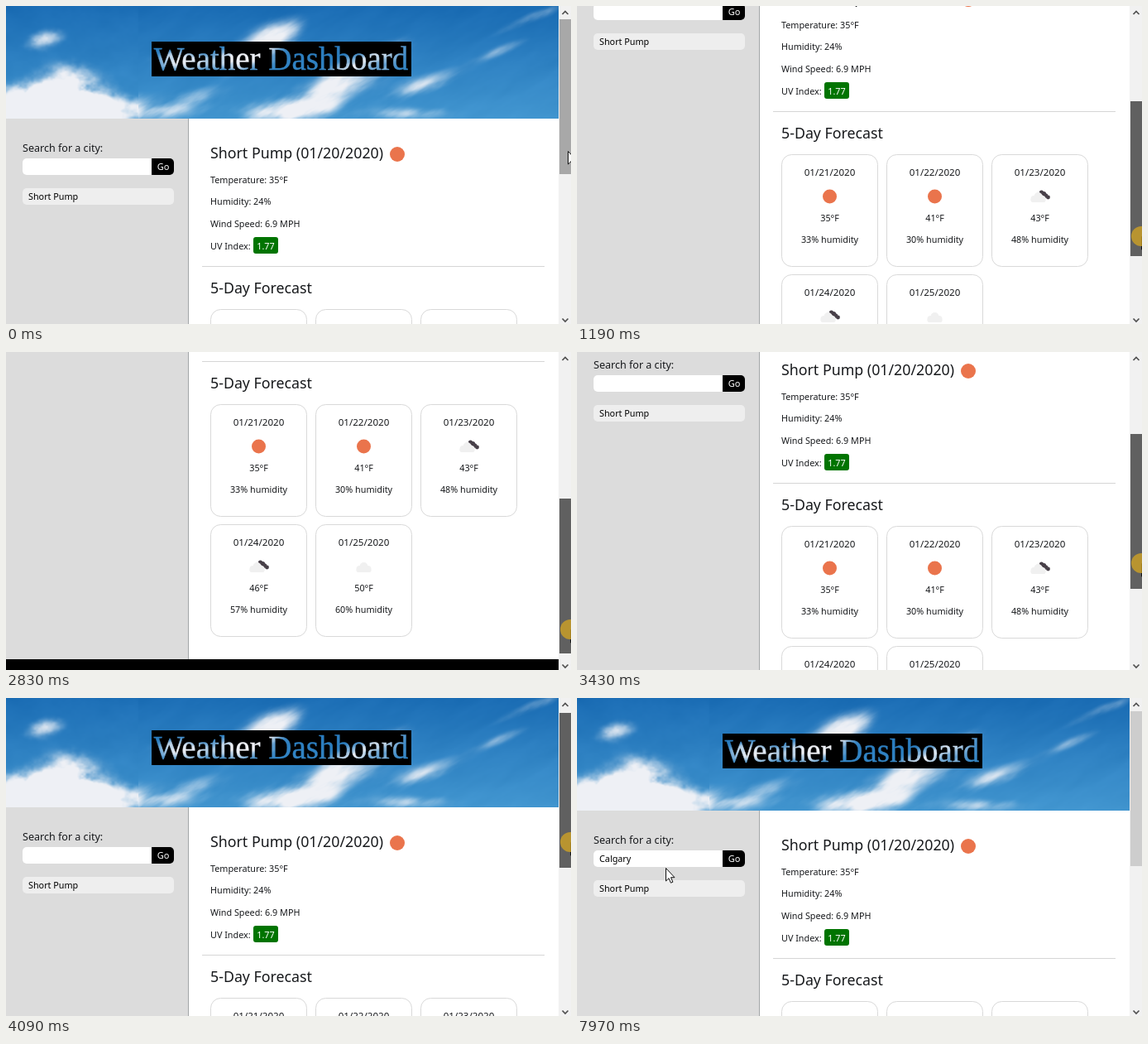
Animation, 683 px wide and 384 px high, one loop 8 s. Source, as an HTML page with a canvas:

```html
<!DOCTYPE html>
<html lang="en">
<head>
<meta charset="utf-8">
<title>Weather Dashboard</title>
<style>
  html, body { margin: 0; width: 100%; height: 100%; overflow: hidden; background: #fff; }
  #stage { position: relative; width: 683px; height: 384px; overflow: hidden; }
  #page { position: absolute; left: 0; top: 0; width: 668px; height: 695px; background: #fff; }
  header { position: absolute; left: 0; top: 0; width: 668px; height: 136px; isolation: isolate; overflow: hidden; }
  canvas { display: block; }
  h1 {
    position: absolute; left: 175.5px; top: 43px; width: 314px; height: 42px; margin: 0;
    font: 400 39px/42px "Liberation Serif", serif; text-align: center; white-space: nowrap;
    color: #fff; background: #000; mix-blend-mode: multiply; -webkit-text-stroke: .4px #fff;
  }
  svg { position: absolute; left: 0; top: 0; font-family: "Noto Sans", "Open Sans", sans-serif; }
  text { white-space: pre; }
</style>
</head>
<body>
<div id="stage">
  <div id="page">
    <header><canvas id="sky" width="668" height="136"></canvas><h1>Weather Dashboard</h1></header>
    <svg id="content" width="668" height="695"></svg>
  </div>
  <svg id="overlay" width="683" height="384"></svg>
</div>
<script>
const LOOP = 8000, MAX_SCROLL = 311, THUMB_H = 187, THUMB_TRAVEL = 165;
const $ = id => document.getElementById(id);
const clamp = (v, a = 0, b = 1) => Math.min(b, Math.max(a, v));
const mix = (a, b, k) => a + (b - a) * k;

// ---- Sky ----
const hash = (x, y) => { const s = Math.sin(x * 127.1 + y * 311.7) * 43758.5453; return s - Math.floor(s); };
function noise(x, y) {
  const i = Math.floor(x), j = Math.floor(y);
  const fade = f => f * f * (3 - 2 * f), u = fade(x - i), v = fade(y - j);
  return mix(mix(hash(i, j), hash(i + 1, j), u), mix(hash(i, j + 1), hash(i + 1, j + 1), u), v);
}
function fbm(x, y) {
  let sum = 0;
  for (let o = 0, amp = .53; o < 4; o++, amp /= 2, x *= 2.03, y *= 2.03) sum += amp * noise(x, y);
  return sum;
}
// x, y, rx, ry, density, slope
const CLOUDS = [
  [75, 98, 38, 26, 1.4, 0], [20, 114, 40, 20, 1.3, 0], [112, 119, 42, 18, 1.1, 0], [60, 132, 90, 14, 1.2, 0],
  [45, 40, 24, 12, .7, .2], [190, 126, 50, 10, .4, 0], [225, 108, 55, 13, .4, .1],
  [325, 33, 32, 20, .8, .3], [288, 62, 36, 16, 1, .1], [215, 66, 36, 14, .75, 0],
  [395, 98, 75, 26, .8, .45], [435, 62, 40, 12, .5, .4], [505, 95, 45, 12, .6, .3],
  [330, 126, 60, 14, .6, 0], [485, 129, 60, 9, .55, 0], [635, 14, 45, 8, .55, .4], [600, 52, 40, 8, .4, .4]
];
function paintSky() {
  const ctx = $('sky').getContext('2d'), W = 668, H = 136, img = ctx.createImageData(W, H);
  for (let y = 0, p = 0; y < H; y++) for (let x = 0; x < W; x++, p += 4) {
    let d = 0;
    for (const [cx, cy, rx, ry, amp, slope] of CLOUDS) {
      const dx = x - cx, dy = y - cy + dx * slope;
      d += amp * Math.exp(-((dx / rx) ** 2) - (dy / ry) ** 2);
    }
    const n = x < 160 ? fbm(x / 24, y / 20) : fbm((x * .87 - y * .5) / 48, (x * .5 + y * .87) / 15);
    let a = clamp((d * (.25 + 1.4 * n) - .12) / .85);
    a = a * a * (3 - 2 * a);
    const g = y / H, shade = 10 * (n - .5);
    img.data[p] = mix(mix(26, 66, g) + shade, 238, a);
    img.data[p + 1] = mix(mix(108, 150, g) + shade, 240, a);
    img.data[p + 2] = mix(mix(180, 208, g) + shade, 245, a);
    img.data[p + 3] = 255;
  }
  ctx.putImageData(img, 0, 0);
}

// ---- Drawing helpers ----
function add(parent, tag, attrs, text) {
  const el = document.createElementNS('http://www.w3.org/2000/svg', tag);
  for (const k in attrs) el.setAttribute(k, attrs[k]);
  if (text != null) el.textContent = text;
  parent.appendChild(el);
  return el;
}
const set = (el, attrs) => { for (const k in attrs) el.setAttribute(k, attrs[k]); };
const show = (el, on) => el.setAttribute('visibility', on ? 'visible' : 'hidden');
const box = (g, x, y, width, height, fill, rx = 0, more = {}) => add(g, 'rect', { x, y, width, height, fill, rx, ...more });
const dot = (g, cx, cy, r, fill) => add(g, 'circle', { cx, cy, r, fill });
const label = (g, x, y, str, size = 10.8, more = {}) =>
  add(g, 'text', { x, y, 'font-size': size, fill: '#17191c', ...more }, str);
const centered = { 'text-anchor': 'middle' };
const SUN = '#ea744c';

function cloud(g, x, y) {
  dot(g, x - 5, y + 3, 4, '#f0f0f0');
  dot(g, x, y, 5, '#f0f0f0');
  dot(g, x + 5, y + 3, 4, '#f0f0f0');
  box(g, x - 9, y + 2, 18, 5, '#f0f0f0', 2.5);
}
const icons = {
  sun(g, x, y) { dot(g, x, y, 8.5, SUN); },
  cloud,
  broken(g, x, y) {
    for (const [dx, dy, r] of [[2, -5, 2.6], [5, -3.5, 2.6], [7, -1, 2.8], [10, 1, 2.4]]) dot(g, x + dx, y + dy, r, '#484049');
    cloud(g, x - 2, y);
  }
};

function card(g, x, y, date, icon, temp, humidity) {
  box(g, x + .5, y + .5, 116, 135, '#fff', 12, { stroke: '#d9d9d9' });
  const cx = x + 58.5;
  label(g, cx, y + 26, date, 11.6, { ...centered, 'font-weight': 500 });
  icons[icon](g, cx, y + 51);
  label(g, cx, y + 81, temp + '°F', 10.8, centered);
  label(g, cx, y + 107, humidity + '% humidity', 10.8, centered);
}

// ---- Page ----
const page = $('content');
box(page, 0, 136, 220, 538, '#dcdcdc');
box(page, 220, 136, 1, 538, '#a3a6a8');
label(page, 20, 176, 'Search for a city:', 12.55);
box(page, 20, 184, 183, 20, '#fff', 5);
add(page, 'path', { d: 'M176 184h22a5 5 0 0 1 5 5v10a5 5 0 0 1-5 5h-22z', fill: '#000' });
label(page, 190, 198, 'Go', 11, { ...centered, fill: '#fff' });
box(page, 20, 220, 183, 20, '#eee', 5);
label(page, 27, 234, 'Short Pump', 10.8, { fill: '#000' });

label(page, 247, 184, 'Short Pump (01/20/2020)', 17.8);
dot(page, 473, 179, 9, SUN);
label(page, 247, 214, 'Temperature: 35°F');
label(page, 247, 240, 'Humidity: 24%');
label(page, 247, 267, 'Wind Speed: 6.9 MPH');
label(page, 247, 294, 'UV Index:');
box(page, 299, 279, 30, 20, '#007400', 3);
label(page, 314, 294, '1.77', 10.8, { ...centered, fill: '#fff' });
box(page, 237, 314, 414, 1, '#d6d6d6');
label(page, 247, 347, '5-Day Forecast', 17.8);
[
  ['01/21/2020', 'sun', 35, 33], ['01/22/2020', 'sun', 41, 30], ['01/23/2020', 'broken', 43, 48],
  ['01/24/2020', 'broken', 46, 57], ['01/25/2020', 'cloud', 50, 60]
].forEach((day, i) => card(page, 247 + 127 * (i % 3), i < 3 ? 366 : 511, ...day));
box(page, 0, 674, 668, 21, '#000');

// Search field
const typed = label(page, 27, 198, '', 10.8, { fill: '#000' });
const caret = box(page, 27, 187, 1, 14, '#000');
const menu = add(page, 'g', {});
const menuBox = box(menu, 20.5, 205.5, 158, 122, '#fff', 0, { stroke: '#c8c8c8' });
const options = Array.from({ length: 6 }, (_, i) => label(menu, 27, 220 + 20 * i, ''));
const CITIES = ['Calgary', 'Cairo', 'Chicago', 'Charlotte', 'Columbus', 'Cleveland'];

// ---- Scrollbar and pointer ----
const over = $('overlay');
box(over, 668, 0, 15, 384, '#f1f1f1');
const thumb = box(over, 669, 16, 14, THUMB_H, '#cdcdcd');
for (const d of ['M672.5 10l3.5-3.5 3.5 3.5', 'M672.5 377.5l3.5 3.5 3.5-3.5'])
  add(over, 'path', { d, fill: 'none', stroke: '#505050', 'stroke-width': 1.7 });
const arrow = add(over, 'path', {
  d: 'M.5 .5V16L4 12.7L6.4 18.2L8.9 17.2L6.5 11.7H11Z', fill: '#fff', stroke: '#111', 'stroke-linejoin': 'round'
});
const beam = add(over, 'path', { d: 'M-3-7.5h2.5l.5.5.5-.5H3M0-7V7M-3 7.5h2.5L0 7l.5.5H3', fill: 'none', stroke: '#111' });
const press = dot(over, 0, 0, 12, 'rgba(213,165,32,.75)');

// ---- Timeline ----
function track(points, t) {
  if (t <= points[0][0]) return points[0][1];
  for (let i = 1; i < points.length; i++) {
    const [t0, v0] = points[i - 1], [t1, v1] = points[i];
    if (t < t1) return mix(v0, v1, (t - t0) / (t1 - t0));
  }
  return points[points.length - 1][1];
}
const last = (rows, t) => rows.filter(r => r[0] <= t).pop();
const tick = (t, start, step) => start + Math.floor((t - start) / step) * step;

const DOWN = [[478, 0], [556, 14], [790, 83], [1350, 232], [1726, 301], [2116, MAX_SCROLL]];
const UP = [[2690, MAX_SCROLL], [2772, 303], [3428, 156], [4084, 4], [4330, 0]];
const GRIP = [[250, 160], [790, 165], [1730, 161], [3430, 156]];
const MOVE_X = [[4479, 682], [4560, 655], [4720, 480], [4880, 270], [5040, 135], [5127, 112]];
const MOVE_Y = [[4479, 173], [4560, 180], [4720, 202], [4880, 216], [5040, 210], [5127, 202]];
// time, field text, menu rows, menu opacity
const TYPING = [
  [0, '', 0, 0], [6160, 'C', 6, .6], [6220, 'C', 6, 1], [6390, 'Ca', 2, 1], [6550, 'Cal', 1, 1],
  [6790, 'Calg', 1, 1], [7880, 'Calgary', 1, .5], [7970, 'Calgary', 0, 0]
];
const BLINK = [[0, 0], [5300, 1], [5850, 0], [6160, 1], [6940, 0], [7490, 1], [7880, 0]];

function scrollAt(t) {
  return Math.round(t < 2700 ? track(DOWN, tick(t, 556, 78)) : track(UP, tick(t, 2772, 82)));
}

let shown = null;
function renderTyping(t) {
  const row = last(TYPING, t), [, str, rows, opacity] = row;
  if (row !== shown) {
    shown = row;
    typed.textContent = str;
    menu.setAttribute('opacity', opacity);
    menuBox.setAttribute('height', 2 + 20 * rows);
    options.forEach((o, i) => { o.textContent = i < rows ? CITIES[i] : ''; });
    caret.setAttribute('x', 27 + Math.round(str ? typed.getComputedTextLength() : 0));
  }
  show(menu, rows > 0);
  show(caret, last(BLINK, t)[1]);
}

function pointerAt(t, thumbTop) {
  if (t < 250) return [679, 175];
  if (t < 4560) return [682, thumbTop + Math.round(track(GRIP, t))];
  if (t < 5620) { const k = tick(t, 4560, 81); return [track(MOVE_X, k), track(MOVE_Y, k)]; }
  return t < 7880 ? [108, 204] : [107, 205];
}

function render(t) {
  const scroll = scrollAt(t), top = 16 + Math.round(scroll * THUMB_TRAVEL / MAX_SCROLL);
  $('page').style.transform = `translateY(${-scroll}px)`;
  const dragging = t >= 250 && t < 4560;
  set(thumb, { y: top, fill: t < 250 ? '#a8a8a8' : dragging ? '#606060' : '#cdcdcd' });

  const [x, y] = pointerAt(t, top).map(Math.round);
  const inField = t >= 5127 && t < 5620;
  set(arrow, { transform: `translate(${x} ${y})` });
  set(beam, { transform: `translate(${x + .5} ${y + .5})` });
  set(press, { cx: x, cy: y });
  show(arrow, !inField);
  show(beam, inField);
  show(press, dragging || (t >= 5300 && t < 5360));
  renderTyping(t);
}

paintSky();
const start = performance.now();
function frame() {
  render((performance.now() - start) % LOOP);
  requestAnimationFrame(frame);
}
frame();
</script>
</body>
</html>
```
